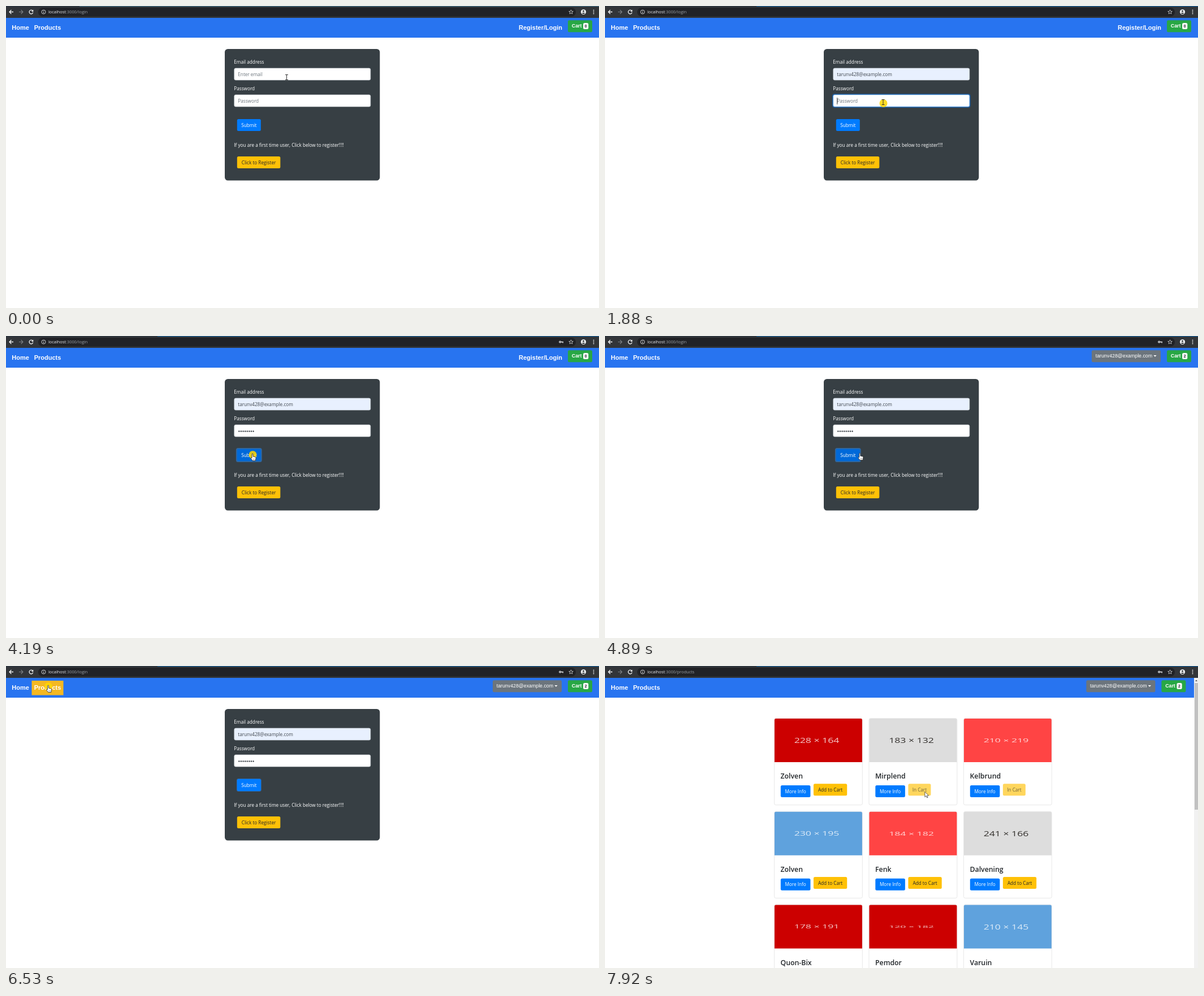
These frames come from a looping animation (1049 px wide and 534 px high, 8000 ms). An HTML page with a canvas:

```html
<!DOCTYPE html>
<html lang="en">
<head>
<meta charset="utf-8">
<title>Shop login</title>
<style>
  html, body { margin: 0; width: 100%; height: 100%; overflow: hidden; background: #fff; }
  canvas { display: block; }
</style>
</head>
<body>
<canvas id="stage" width="1049" height="534"></canvas>
<script>
const ctx = document.getElementById('stage').getContext('2d');
const LOOP = 8000;
const UI = '"Open Sans", "Noto Sans", sans-serif';
const ARIAL = '"Liberation Sans", Arial, sans-serif';
const EMAIL = 'tarunv428@example.com', OTHER_EMAIL = 'nia@example.com';
const BLUE = '#007bff', YELLOW = '#ffc107', INK = '#212529', AUTOFILL = '#e8f0fe';
const RED = '#cc0000', GREY = '#dddddd', CORAL = '#ff4444', SKY = '#5fa2dd';

// name, image width, image height, image colour, already in cart
const PRODUCTS = [
  ['Zolven', 228, 164, RED], ['Mirplend', 183, 132, GREY, true], ['Kelbrund', 210, 219, CORAL, true],
  ['Zolven', 230, 195, SKY], ['Fenk', 184, 182, CORAL], ['Dalvening', 241, 166, GREY],
  ['Quon-Bix', 178, 191, RED], ['Pemdor', 120, 182, RED], ['Varuin', 210, 145, SKY],
];

// time, x, y of the pointer's hot spot
const PATH = [
  [0, 496.5, 126], [790, 496.5, 125], [930, 499, 142.5], [1310, 499, 142.5], [1800, 492, 170],
  [3570, 492, 170], [4110, 436, 208], [4810, 436, 208], [4890, 464.5, 206], [4970, 524, 130],
  [5050, 160, 22], [5510, 84, 38], [5610, 84, 38], [5910, 72, 38], [6300, 72, 38], [6450, 74.5, 34],
  [6920, 74.5, 34], [7760, 551, 228], [7920, 574.5, 219],
];
const CLICKS = [[80, 230], [1160, 1310], [1800, 1950], [4110, 4260], [6370, 6610]];

const during = (t, from, to) => t >= from && t < to;
const inside = (p, x0, y0, x1, y1) => p.x >= x0 && p.x <= x1 && p.y >= y0 && p.y <= y1;

function rect(x, y, w, h, fill, radius = 0, stroke) {
  ctx.beginPath();
  ctx.roundRect(x, y, w, h, radius);
  if (fill) { ctx.fillStyle = fill; ctx.fill(); }
  if (stroke) { ctx.strokeStyle = stroke; ctx.lineWidth = 0.7; ctx.stroke(); }
}

function text(str, x, y, size, color, { weight = 400, family = UI, align = 'left' } = {}) {
  ctx.font = `${weight} ${size}px ${family}`;
  ctx.fillStyle = color;
  ctx.textAlign = align;
  ctx.fillText(str, x, y);
  return ctx.measureText(str).width;
}

function shape(d, { fill, stroke, width = 1, x = 0, y = 0 }) {
  const path = new Path2D(d);
  ctx.save();
  ctx.translate(x, y);
  if (fill) { ctx.fillStyle = fill; ctx.fill(path); }
  if (stroke) { ctx.strokeStyle = stroke; ctx.lineWidth = width; ctx.stroke(path); }
  ctx.restore();
}

function circle(x, y, r, fill) {
  ctx.beginPath();
  ctx.arc(x, y, r, 0, 7);
  ctx.fillStyle = fill;
  ctx.fill();
}

function button(label, x, y, w, fill, color = '#fff') {
  rect(x, y, w, 21, fill, 2.5);
  text(label, x + w / 2, y + 13.6, 8.2, color, { align: 'center' });
}

function pointer(t) {
  const time = Math.floor(t / 77) * 77;
  const i = PATH.findIndex(k => k[0] > time);
  if (i < 0) return { x: 574.5, y: 219 };
  const [t0, x0, y0] = PATH[i - 1], [t1, x1, y1] = PATH[i];
  const u = (time - t0) / (t1 - t0), e = u * u * (3 - 2 * u);
  return { x: x0 + (x1 - x0) * e, y: y0 + (y1 - y0) * e };
}

function browserBar(t, url) {
  rect(0, 0, 1049, 21, '#323539');
  rect(0, 0, 268, 1, '#26323c');
  rect(t < 80 ? 130 : 268, 0, 919, 1, t < 80 ? '#3b6b85' : '#0d5f9f');
  rect(57, 3, 951, 15.5, '#212226', 7.7);
  const arrow = 'M13 10.5H6M9.4 7L6 10.5L9.4 14';
  shape(arrow, { stroke: '#f1f3f4', width: 1.3 });
  ctx.save();
  ctx.translate(36, 0);
  ctx.scale(-1, 1);
  shape(arrow, { stroke: '#7c8084', width: 1.1 });
  ctx.restore();
  shape('M47 8.3A3.4 3.4 0 1 0 47.8 11.4', { stroke: '#f1f3f4', width: 1.3 });
  shape('M48.3 6.5V10H44.8Z', { fill: '#f1f3f4' });
  shape('M70 10.5A3.5 3.5 0 1 1 63 10.5A3.5 3.5 0 1 1 70 10.5M66.5 10V12.6M66.5 8.2V9.1', { stroke: '#dfe1e5', width: 0.9 });
  const w = text('localhost', 75, 13.2, 7.4, '#e8eaed');
  text(':3000' + url, 75 + w, 13.2, 7.4, '#9aa0a6');
  if (t >= 3040) {
    circle(980.2, 10.5, 2.1, '#d5d7da');
    circle(980.2, 10.5, 0.7, '#212226');
    shape('M982 10.5H986M985 10.5V12.4', { stroke: '#d5d7da', width: 1.3 });
  }
  shape('M999.5 6.8L1000.6 9.3L1003.3 9.5L1001.2 11.2L1001.9 13.9L999.5 12.5L997.1 13.9L997.8 11.2L995.7 9.5L998.4 9.3Z', { stroke: '#d5d7da', width: 0.8 });
  circle(1021.5, 10.5, 4.6, '#eef0f2');
  circle(1021.5, 8.9, 1.5, '#323539');
  shape('M1018.6 12.8Q1021.5 10.5 1024.4 12.8Q1021.5 15.4 1018.6 12.8', { fill: '#323539' });
  for (const y of [7.5, 10.5, 13.5]) circle(1039.5, y, 0.9, '#eef0f2');
}

function navBar(t, p, shift) {
  const bold = { weight: 700, family: ARIAL };
  rect(0, 21, 1049, 35, '#2874f0');
  if (t > 5050 && inside(p, 45, 26, 101, 51)) rect(45.5, 26, 56, 25.5, '#f4b822');
  text('Home', 10.3, 42, 11, '#fff', bold);
  text('Products', 49.7, 42, 11, '#fff', bold);
  const loggedIn = t >= 4340;
  if (loggedIn) {
    rect(861 - shift, 25.3, 122, 21, '#6c757d', 2.5);
    text(EMAIL, 867.7 - shift, 38.3, 8.8, '#fff', { family: ARIAL });
    shape('M970.3 34H975.7L973 36.8Z', { fill: '#fff', x: -shift });
  } else {
    text('Register/Login', 907, 41.6, 11, '#fff', bold);
  }
  rect(994 - shift, 25.3, 43, 21, '#28a745', 2.5);
  text('Cart', 1000.8 - shift, 38.3, 8.8, '#fff', bold);
  rect(1021 - shift, 30, 9.3, 11, '#f8f9fa', 2.5);
  text(loggedIn ? '2' : '0', 1025.6 - shift, 38.2, 6.8, INK, { ...bold, align: 'center' });
}

function field(y, { focused, fill = '#fff', value, placeholder, caret }) {
  if (focused) rect(402, y - 1.7, 244.6, 24.4, 'rgba(0,123,255,.45)', 4);
  rect(403.8, y, 241, 21, fill, 2.5, focused ? '#80bdff' : '#ced4da');
  if (value || placeholder) text(value || placeholder, 410.3, y + 13.8, 8.2, value ? '#40474e' : '#6c757d');
  if (caret !== undefined) rect(caret, y + 5, 0.8, 12, '#111');
}

function loginPage(t, p) {
  const label = (str, y) => text(str, 403.3, y, 8.2, '#fff');
  rect(387, 76, 274.3, 232.5, '#373f44', 5.5);
  label('Email address', 102);
  label('Password', 149);

  const preview = t >= 860, chosen = t >= 1160;
  const emailCaret = chosen ? 509 : 410.4;
  field(110, {
    focused: during(t, 150, 1800),
    fill: preview ? AUTOFILL : '#fff',
    value: preview ? EMAIL : '',
    placeholder: 'Enter email',
    caret: during(t, 150, 610) || during(t, 860, 1800) ? emailCaret : undefined,
  });

  const dots = t < 3040 ? 0 : t < 3350 ? 1 : t < 3420 ? 6 : t < 3650 ? 7 : 8;
  const caretOn = during(t, 1800, 2340) || during(t, 2890, 4110);
  field(157, {
    focused: during(t, 1800, 4110),
    placeholder: dots ? '' : 'Password',
    caret: caretOn ? 410.4 + dots * 3.6 : undefined,
  });
  for (let i = 0; i < dots; i++) circle(412.3 + i * 3.6, 168.5, 1.25, '#3b4248');

  const hover = t > 3650 && t < 4970 && (t >= 4110 || inside(p, 409, 200, 451, 221));
  if (t >= 4110) {
    const ring = t < 4970 ? 1.9 : 0.9;
    rect(408.8 - ring, 200 - ring, 42 + 2 * ring, 21 + 2 * ring, 'rgba(38,143,255,.5)', 3.5);
  }
  button('Submit', 408.8, 200, 42, hover ? '#0069d9' : BLUE);
  label('If you are a first time user, Click below to register!!!!', 249.2);
  button('Click to Register', 408.8, 266, 76.5, YELLOW, INK);

  if (during(t, 230, 1160)) {
    rect(403, 132, 242, 48.5, '#292a2d', 2);
    if (preview) rect(403, 136, 242, 19.5, '#464749');
    text(EMAIL, 410, 148.4, 6.8, '#f1f3f4', { weight: 600 });
    text(OTHER_EMAIL, 410, 168.1, 6.8, '#f1f3f4', { weight: 600 });
  }
}

function productCard([name, w, h, color, inCart], i) {
  const x = 299.5 + (i % 3) * 167.5, y = 92.7 + Math.floor(i / 3) * 164.7;
  rect(x, y, 155.8, 153, '#fff', 2.7, '#dfdfdf');
  rect(x + 0.4, y + 0.4, 155, 77, color, [2.3, 2.3, 0, 0]);

  // Placeholder pictures are squeezed into the common image box.
  ctx.save();
  ctx.translate(x + 75, y + 39);
  ctx.scale(155 / w, 77 / h);
  const size = w * 0.1138;
  text(`${w} × ${h}`, 0, size * 0.357, size, color === GREY ? '#33302d' : 'rgba(255,255,255,.78)', { align: 'center' });
  ctx.restore();

  text(name, x + 11, y + 106.5, 12.3, INK, { weight: 600 });
  button('More Info', x + 11.3, y + 118.3, 52.6, BLUE);
  ctx.globalAlpha = inCart ? 0.65 : 1;
  button(inCart ? 'In Cart' : 'Add to Cart', x + 69.4, y + 115.5, inCart ? 40 : 59.3, YELLOW, INK);
  ctx.globalAlpha = 1;
}

function scrollBar() {
  rect(1042, 21, 7, 513, '#f1f1f1');
  rect(1043, 30, 6, 224, '#c1c1c1');
  shape('M1044 27L1046 24.5L1048 27Z', { fill: '#505050' });
}

function drawPointer(t, p) {
  const overField = t < 6610 && p.x > 403 && p.x < 645 && (during(p.y, 110, 131) || during(p.y, 157, 179));
  const overLink = t < 6990 && (inside(p, 45, 26, 101, 51) || inside(p, 409, 200, 451, 221));
  if (overField) {
    shape('M-2.5 -4.5H2.5M0 -4.5V4.5M-2.5 4.5H2.5', { ...p, stroke: '#222', width: 0.9 });
  } else if (overLink) {
    shape('M-1 .8Q0 -.5 1 .8V5L5.2 6Q6.3 6.4 6.1 8L5.3 12.5H.2L-3 8.3Q-3 6.8 -1 7.8Z', { ...p, fill: '#fff', stroke: '#222', width: 0.8 });
    shape('M1.1 9V11M2.6 9V11M4.1 9V11', { ...p, stroke: '#555', width: 0.5 });
  } else {
    shape('M0 0V9.3L2.2 7.3L3.8 10.7L5.3 10L3.8 6.8H6.8Z', { ...p, fill: '#fff', stroke: '#222', width: 0.7 });
  }
}

function draw(t) {
  const p = pointer(t), shop = t >= 6610;
  rect(0, 0, 1049, 534, '#fff');
  browserBar(t, shop ? '/products' : '/login');
  navBar(t, p, shop ? 9.6 : 0);
  if (shop) {
    PRODUCTS.forEach(productCard);
    scrollBar();
  } else {
    loginPage(t, p);
  }
  if (CLICKS.some(([from, to]) => during(t, from, to))) circle(p.x + 0.5, p.y + 2, 7, 'rgba(255,214,0,.85)');
  drawPointer(t, p);
}

const start = performance.now();
function tick() {
  draw((performance.now() - start) % LOOP);
  requestAnimationFrame(tick);
}
tick();
</script>
</body>
</html>
```
